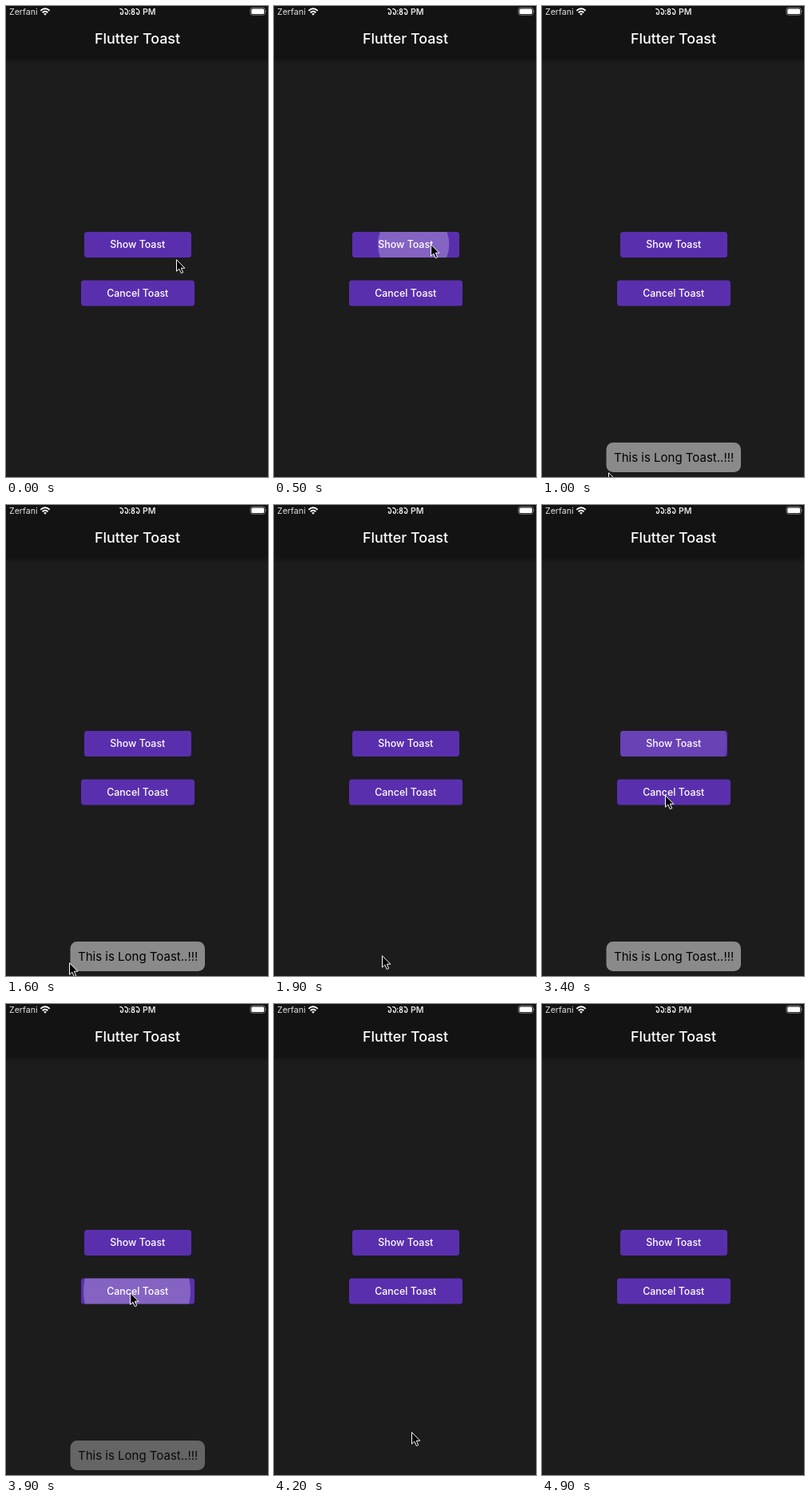
An HTML page that plays this animation: 328x588 px, repeating every 5.6 s.

```html
<!DOCTYPE html>
<html lang="en">
<head>
<meta charset="utf-8">
<title>Flutter Toast</title>
<style>
  html, body { margin: 0; width: 100%; height: 100%; overflow: hidden; background: #1c1c1c; }
  svg { display: block; width: 328px; height: 588px; font-family: Inter, Roboto, sans-serif; }
  .status { font-size: 10.6px; fill: #e2e2e2; }
  .title { font-size: 17.9px; font-weight: 500; fill: #fff; }
  .label { font-size: 12.4px; font-weight: 500; fill: #fff; }
  .btn { fill: #5a2fae; }
  .mid { text-anchor: middle; }
</style>
</head>
<body>
<svg viewBox="0 0 328 588">
  <defs>
    <linearGradient id="shade" x2="0" y2="1">
      <stop stop-color="#141414"/>
      <stop offset="1" stop-color="#1c1c1c"/>
    </linearGradient>
    <clipPath id="showClip"><rect x="98" y="282" width="134" height="32" rx="3.5"/></clipPath>
    <clipPath id="cancelClip"><rect x="94" y="342.5" width="142" height="32" rx="3.5"/></clipPath>
    <path id="one" d="M.7 .7C3 .5 4.6 2.2 4.6 4.5C4.6 6.6 3.6 7.6 2.4 7.4C1.1 7.2 .9 5.4 2.1 5.1"/>
  </defs>

  <rect width="328" height="588" fill="#1c1c1c"/>
  <rect y="66" width="328" height="6" fill="url(#shade)"/>
  <rect width="328" height="66" fill="#131313"/>

  <text class="status" x="4" y="11">Zerfani</text>
  <g fill="none" stroke="#fff" stroke-width="1.9">
    <path d="M43.3 5.9Q49 .6 54.7 5.9"/>
    <path d="M45.6 8.3Q49 5.2 52.4 8.3"/>
  </g>
  <path d="M47.1 9.8Q49 8.2 50.9 9.8L49 11.8Z" fill="#fff"/>
  <g fill="none" stroke="#fff" stroke-width="1.2" stroke-linecap="round">
    <use href="#one" x="142" y="3"/>
    <use href="#one" x="148" y="3"/>
    <ellipse cx="159" cy="5" rx="1.5" ry="1.5"/>
    <ellipse cx="159" cy="8.8" rx="1.8" ry="1.8"/>
    <use href="#one" x="162.3" y="3"/>
  </g>
  <g fill="#fff"><circle cx="154.8" cy="6" r=".8"/><circle cx="154.8" cy="10" r=".8"/></g>
  <text class="status" x="171" y="11" font-weight="600">PM</text>
  <rect x="306" y="2.2" width="18.4" height="9" rx="2.6" fill="none" stroke="#8a8a8a" stroke-width=".9"/>
  <rect x="307.3" y="3.5" width="15.8" height="6.4" rx="1.5" fill="#fff"/>
  <path d="M325.5 5.2Q327 6.7 325.5 8.2Z" fill="#8a8a8a"/>

  <text class="title mid" x="164.5" y="47">Flutter Toast</text>

  <rect class="btn" x="98" y="282" width="134" height="32" rx="3.5"/>
  <g clip-path="url(#showClip)"><circle id="showInk" fill="#fff"/></g>
  <text class="label mid" x="164.8" y="302.2">Show Toast</text>

  <rect class="btn" x="94" y="342.5" width="142" height="32" rx="3.5"/>
  <g clip-path="url(#cancelClip)"><circle id="cancelInk" fill="#fff"/></g>
  <text class="label mid" x="164.8" y="362.6">Cancel Toast</text>

  <g id="toast">
    <rect x="80.5" y="545" width="168.5" height="37" rx="8.5" fill="#8a8a8a"/>
    <text class="mid" x="165.2" y="569.2" font-size="15">This is Long Toast..!!!</text>
  </g>

  <path id="cursor" d="M.5 .7V15.2L3.8 12.1L6.3 17.6L8.7 16.6L6.3 11.2H10.8Z" fill="#000" stroke="#fff"/>
</svg>
<script>
  const LOOP = 5600, STEP = 100;
  const $ = id => document.getElementById(id);
  const clamp = v => Math.min(1, Math.max(0, v));
  const smooth = k => k * k * (3 - 2 * k);
  const mix = (a, b, k) => a + (b - a) * k;

  // The pointer glides from stop to stop: arrive, leave, x, y
  const stops = [
    [0, 0, 213, 316], [300, 500, 196, 297], [1000, 1000, 83, 582], [1400, 1400, 48, 576],
    [1900, 1900, 135, 562], [2700, 3000, 167, 288], [3400, 3700, 154, 362],
    [3900, 3900, 155, 360], [4200, 4200, 172, 534], [4500, 4900, 205, 357]
  ];

  function pointer(t) {
    const i = stops.findLastIndex(s => s[0] <= t);
    const [, leave, x, y] = stops[i];
    const [arrive, , x2, y2] = stops[i + 1] ?? [LOOP, 0, x, y];
    const k = smooth(clamp((t - leave) / (arrive - leave)));
    return [mix(x, x2, k), mix(y, y2, k)];
  }

  // Rises over 200 ms, falls over the last 300 ms
  const toast = (t, from, to) => clamp(Math.min((t - from) / 200, (to - t) / 300));

  // A press grows toward the button centre, then fades out
  function ink(id, age, life, x, y, cy) {
    const grow = clamp(age / 300);
    const fade = clamp((life - age) / (life - 300));
    const el = $(id);
    el.setAttribute('cx', mix(x, 164, grow));
    el.setAttribute('cy', mix(y, cy, grow));
    el.setAttribute('r', 67 * grow);
    el.setAttribute('opacity', 0.25 * fade ** 1.5);
  }

  function draw(t) {
    const [x, y] = pointer(t).map(Math.round);
    $('cursor').setAttribute('transform', `translate(${x} ${y})`);
    $('cursor').setAttribute('visibility', t < 4900 ? 'visible' : 'hidden');
    $('toast').setAttribute('opacity', Math.max(toast(t, 500, 1900), toast(t, 3000, 4100)));
    if (t < 2800) ink('showInk', t - 300, 700, 196, 297, 298);
    else ink('showInk', t - 2800, 900, 167, 288, 298);
    ink('cancelInk', t - 3600, 600, 155, 360, 358.5);
  }

  let start;
  function tick(now) {
    start ??= now;
    draw(Math.floor((now - start) % LOOP / STEP) * STEP);
    requestAnimationFrame(tick);
  }
  draw(0);
  requestAnimationFrame(tick);
</script>
</body>
</html>
```
